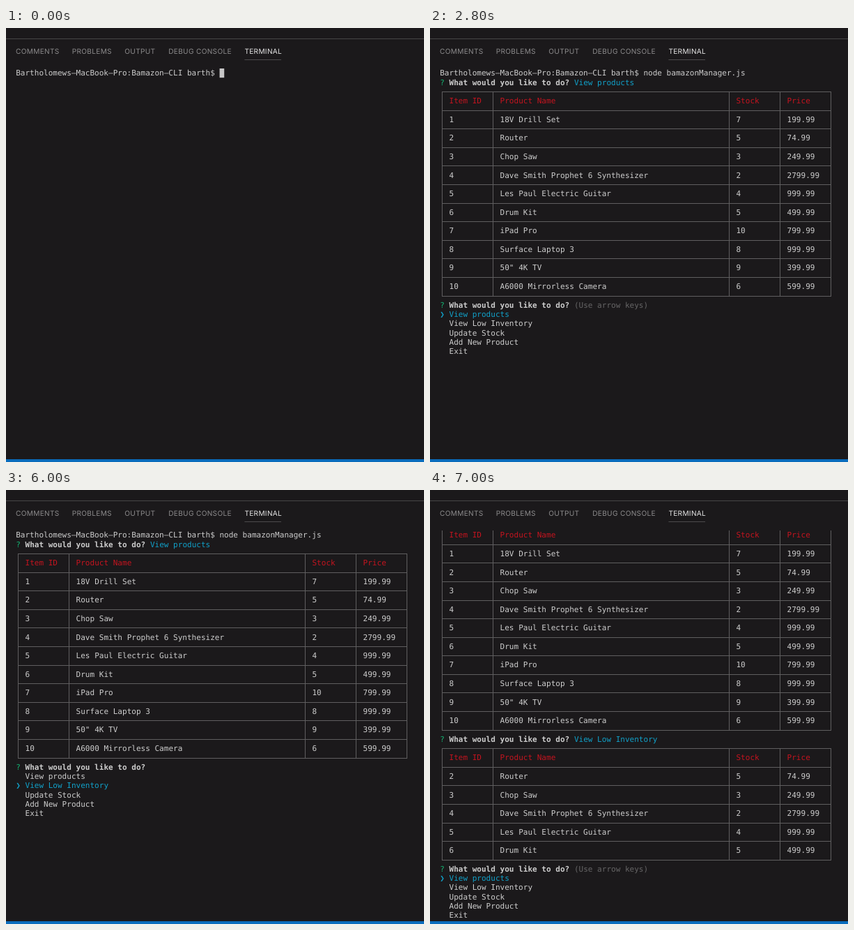
Write an HTML page that moves like this. It is 600 px wide and 622 px high and loops after 8000 ms.

```html
<!DOCTYPE html>
<html lang="en">
<head>
<meta charset="utf-8">
<title>Terminal</title>
<style>
  html, body { margin: 0; width: 100%; height: 100%; overflow: hidden; background: #1b191b; }
  svg { display: block; }
  text { text-rendering: geometricPrecision; white-space: pre; }
  #tabs text { font: 10.15px Inter, "Open Sans", sans-serif; letter-spacing: .3px; fill: #8c8b8c; }
  #tabs .active { fill: #e7e7e7; }
  #term text { font: 11.04px "DejaVu Sans Mono", monospace; fill: #cccccc; }
  #term .bold { font-weight: bold; }
  #term .green { fill: #14b070; }
  #term .cyan { fill: #11a0c8; }
  #term .red { fill: #c4141f; }
  #term .dim { fill: #666566; }
  #term .line { fill: #5f5e5f; }
  #term .cursor { fill: #c8c7c8; }
</style>
</head>
<body>
<svg width="600" height="622" viewBox="0 0 600 622">
  <rect y="15" width="600" height="1" fill="#474647"/>
  <g id="tabs">
    <text x="14" y="37.2">COMMENTS</text>
    <text x="94.7" y="37.2">PROBLEMS</text>
    <text x="170.3" y="37.2">OUTPUT</text>
    <text x="233.2" y="37.2">DEBUG CONSOLE</text>
    <text x="342.4" y="37.2" class="active">TERMINAL</text>
  </g>
  <rect x="342.4" y="45" width="52.6" height="1" fill="#4c4b4c"/>
  <svg id="term" y="58" width="600" height="560" viewBox="0 58 600 560"></svg>
  <rect y="618" width="600" height="4" fill="#0a6cbc"/>
</svg>
<script>
const LEFT = 14.2, TOP = 57.9, CHAR = 6.645, ROW = 13.29;
const PROMPT = "Bartholomews–MacBook–Pro:Bamazon–CLI barth$ ";
const COMMAND = "node bamazonManager.js";
const ACTIONS = ["View products", "View Low Inventory", "Update Stock", "Add New Product", "Exit"];
const HEAD = ["Item ID", "Product Name", "Stock", "Price"];
const PRODUCTS = [
  ["18V Drill Set", 7, "199.99"],
  ["Router", 5, "74.99"],
  ["Chop Saw", 3, "249.99"],
  ["Dave Smith Prophet 6 Synthesizer", 2, "2799.99"],
  ["Les Paul Electric Guitar", 4, "999.99"],
  ["Drum Kit", 5, "499.99"],
  ["iPad Pro", 10, "799.99"],
  ["Surface Laptop 3", 8, "999.99"],
  ['50" 4K TV', 9, "399.99"],
  ["A6000 Mirrorless Camera", 6, "599.99"],
].map((p, i) => [i + 1, ...p]);
const LOW = PRODUCTS.filter(p => p[2] <= 5);
const EDGES = [0, 11, 62, 73, 84];

const colX = col => LEFT + col * CHAR;
const rowY = row => TOP + row * ROW;
const midY = row => Math.round(rowY(row + .5));

const text = (col, row, str, cls = "") =>
  `<text x="${colX(col)}" y="${rowY(row) + 10.5}" class="${cls}">${str}</text>`;
const rect = (x, y, w, h, cls) =>
  `<rect x="${x}" y="${y}" width="${w}" height="${h}" class="${cls}"/>`;
const cursor = (col, row) => rect(colX(col), rowY(row), CHAR, ROW, "cursor");

const question = (row, answer = "", cls = "cyan") =>
  text(0, row, "?", "green") + text(2, row, "What would you like to do?", "bold") + text(29, row, answer, cls);

const menu = (row, picked = 0) =>
  question(row, picked ? "" : "(Use arrow keys)", "dim") +
  text(0, row + 1 + picked, "❯", "cyan") +
  ACTIONS.map((a, i) => text(2, row + 1 + i, a, i === picked ? "cyan" : "")).join("");

function table(row, items) {
  const lines = [HEAD, ...items];
  const xs = EDGES.map(c => Math.floor(colX(c + .5)));
  const top = midY(row), bottom = midY(row + 2 * lines.length);
  let out = xs.map(x => rect(x, top, 1, bottom - top + 1, "line")).join("");
  for (let i = 0; i <= lines.length; i++)
    out += rect(xs[0], midY(row + 2 * i), xs[4] - xs[0] + 1, 1, "line");
  lines.forEach((cells, i) => cells.forEach((cell, c) => {
    out += text(EDGES[c] + 2, row + 1 + 2 * i, cell, i ? "" : "red");
  }));
  return out;
}

const typed = text(0, 0, PROMPT + COMMAND);
const listed = typed + question(1, ACTIONS[0]) + table(2, PRODUCTS);
const lowList = row => question(row, ACTIONS[1]) + table(row + 1, LOW);

// [start in ms, screen content]
const SCREENS = [
  [0, text(0, 0, PROMPT) + cursor(44, 0)],
  [600, typed + cursor(67, 0)],
  [1200, typed + cursor(0, 1)],
  [1600, typed + menu(1)],
  [2800, listed + menu(25)],
  [5200, listed + menu(25, 1)],
  [6200, listed + lowList(25) + cursor(0, 39)],
  [6400, table(-1, PRODUCTS) + lowList(22) + menu(36)],
];

const term = document.getElementById("term");
let shown;
function draw(now) {
  const t = now % 8000;
  const screen = SCREENS.findLast(s => s[0] <= t);
  if (screen !== shown) {
    shown = screen;
    term.innerHTML = screen[1];
  }
  requestAnimationFrame(draw);
}
draw(0);
</script>
</body>
</html>
```
